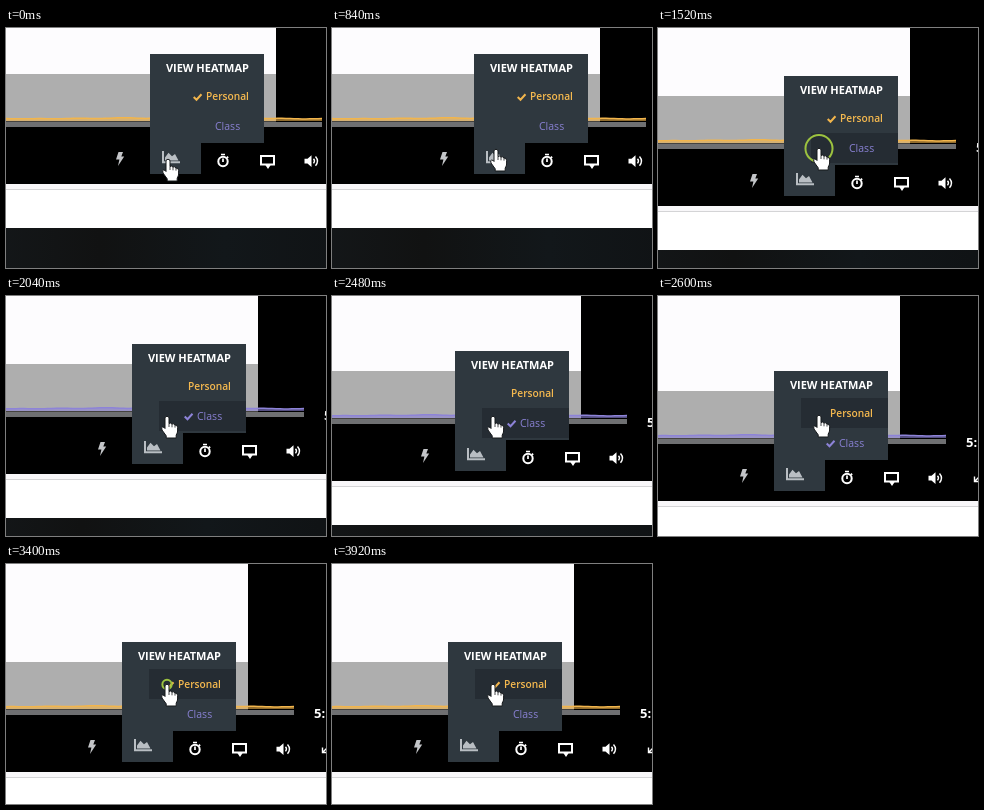
Animation of 320 by 240 pixels, one loop 3960 ms. Source, as an HTML page:

```html
<!DOCTYPE html>
<html lang="en">
<head>
<meta charset="utf-8">
<title>Heatmap menu</title>
<style>
  html, body { margin: 0; width: 100%; height: 100%; overflow: hidden; background: #fff; }
  svg { display: block; width: 100vw; height: 100vh; }
  text { font-family: "Open Sans", "Noto Sans", sans-serif; }
  .title { font-size: 11px; font-weight: 700; fill: #fff; }
  .personal { font-size: 10.2px; font-weight: 600; fill: #f5b94f; }
  .class { font-size: 10.5px; fill: #8880d2; }
  .time { font-size: 13px; font-weight: 700; fill: #fff; }
  .line { fill: none; stroke-width: 2; }
</style>
</head>
<body>
<svg viewBox="0 0 320 240">
  <defs>
    <linearGradient id="footer">
      <stop offset="0" stop-color="#15191c"/>
      <stop offset=".3" stop-color="#111212"/>
      <stop offset=".55" stop-color="#12171a"/>
      <stop offset="1" stop-color="#0e0f10"/>
    </linearGradient>
  </defs>

  <!-- Origin of the page group: top left corner of the menu -->
  <g id="page">
    <rect x="-200" y="-100" width="500" height="400" fill="#fff"/>
    <rect x="-200" y="-100" width="500" height="230" fill="#000"/>
    <rect x="-200" y="-100" width="326" height="120" fill="#fdfcfe"/>
    <rect x="-200" y="20" width="326" height="47" fill="#aeaeae"/>
    <g id="graph">
      <path id="area" opacity=".6"/>
      <path id="curve" fill="none" stroke-width="1.5"/>
    </g>
    <rect x="-200" y="67" width="326" height="1" fill="#45433f"/>
    <rect x="-200" y="68" width="372" height="5" fill="#6f7072"/>
    <rect x="-200" y="130" width="500" height="5" fill="#f8f7f9"/>
    <rect x="-200" y="135" width="500" height="1" fill="#d4d4d6"/>
    <rect x="-200" y="174" width="500" height="120" fill="url(#footer)"/>

    <text class="time" x="192" y="75.5">5:</text>

    <path d="M-31.5 98H-27L-28.7 102.5H-25.8L-32 112L-30.6 105.5H-34Z" fill="#c3c5c8"/>
    <g class="line" stroke="#fff">
      <circle cx="73" cy="107.5" r="4.7"/>
      <path d="M71 100.5h4M73 104.5v3.5M76.8 102.7l1.4 1.2" stroke-width="1.7"/>
      <path d="M111 102H124V110.5H111Z"/>
      <path d="M163.5 104.8q2 2.2 0 4.6M165.5 102.5q4 4.6 0 9.2" stroke-width="1.4"/>
      <path d="M200.5 105.5V110.5H205.5M201 110L207 104" stroke-width="1.4"/>
    </g>
    <path d="M115 110.5H121L118 115ZM154.5 104.8H157.5L161.5 101.2V113L157.5 109.4H154.5Z" fill="#fff"/>

    <path d="M0 0H114V89H51V120H0Z" fill="#2f383f"/>
    <rect id="hover" x="27" width="87" height="30" fill="#252c33"/>
    <path class="line" d="M13 97V108.3H30" stroke="#b9bec3" stroke-width="1.3"/>
    <path d="M15 106.5V103.5L18.5 98.8L22 102.3L25 100L28.5 106.5Z" fill="#b9bec3"/>
    <text class="title" x="99" y="18" text-anchor="end">VIEW HEATMAP</text>
    <text class="personal" x="56" y="46">Personal</text>
    <text class="class" x="65" y="76">Class</text>
    <path id="check" class="line" d="M43.7 43L46.5 45.7L51.5 40.3"/>
  </g>

  <circle id="ring" class="line" stroke="#9cc23f"/>
  <g id="hand" stroke="#15181b" stroke-width="1" stroke-linejoin="round">
    <path fill="#fff" d="M-2 2Q-2 .3 0 .3Q2 .3 2 2V7.5Q3.5 6.4 5 8Q6.7 7.2 8 9Q10.6 8.6 10.6 11.5V15Q10.6 17 9.2 19V22H-.8V19.8L-5 14Q-6 11.3 -4.3 11Q-3 11 -2 12.5Z"/>
    <path fill="none" stroke-width=".8" d="M2 7.5V11M5 8V11.3M8 9V11.6"/>
  </g>
</svg>
<script>
  const LOOP = 3960, STEP = 40;
  const ORANGE = '#f2b54c', PURPLE = '#8d83d8';
  const el = id => document.getElementById(id);

  // time, x, y
  const camera = [
    [400, 144, 26], [840, 142, 26], [880, 140, 30], [920, 140, 30],
    [1000, 129, 43], [1040, 126, 47], [1240, 126, 48], [2400, 126, 48],
    [2480, 123, 55], [2560, 118, 71], [2600, 116, 75], [2920, 116, 78]
  ];
  const pointer = [
    [400, 162, 131], [840, 164, 121], [920, 164, 121], [1040, 161, 120],
    [2560, 161, 120], [2600, 161, 119], [2920, 161, 120]
  ];
  // start, duration
  const clicks = [[1480, 440], [3240, 440], [3800, 160]];

  function at(keys, t) {
    const i = keys.findIndex(k => k[0] > t);
    if (i === 0) return keys[0].slice(1);
    if (i < 0) return keys[keys.length - 1].slice(1);
    const a = keys[i - 1], b = keys[i], p = (t - a[0]) / (b[0] - a[0]);
    return [1, 2].map(n => Math.round(a[n] + (b[n] - a[n]) * p));
  }

  const move = (id, x, y) => el(id).setAttribute('transform', `translate(${x} ${y})`);

  function buildGraph() {
    let d = '';
    for (let x = -200; x <= 172; x += 4) {
      const bump = Math.exp(-(((x + 24) / 20) ** 2));
      const y = 64.6 - bump - 0.35 * Math.sin(x / 9) * Math.cos(x / 23);
      d += `${d ? 'L' : 'M'}${x} ${y.toFixed(2)}`;
    }
    el('curve').setAttribute('d', d);
    el('area').setAttribute('d', d + 'V67H-200Z');
  }

  function draw(t) {
    const [x, y] = at(camera, t), [px, py] = at(pointer, t);
    move('page', x, y);
    move('hand', px, py);

    const row = Math.floor((py - y - 27) / 30);
    el('hover').setAttribute('y', 27 + row * 30);
    el('hover').style.display = row === 0 || row === 1 ? '' : 'none';

    const shared = t >= 1600 && t < 3360;
    const color = shared ? PURPLE : ORANGE;
    el('curve').style.stroke = el('area').style.fill = el('check').style.stroke = color;
    move('check', shared ? 9 : 0, shared ? 29.5 : 0);

    const click = clicks.find(([s, len]) => t >= s && t < s + len);
    const r = click ? 18 * (1 - (t - click[0]) / click[1]) ** 3 : 0;
    const ring = el('ring');
    ring.style.display = r > 0.5 ? '' : 'none';
    ring.setAttribute('cx', px);
    ring.setAttribute('cy', py + 0.5);
    ring.setAttribute('r', r);
  }

  buildGraph();
  const start = performance.now();
  function tick() {
    const t = (performance.now() - start + 2) % LOOP;
    draw(Math.floor(t / STEP) * STEP);
    requestAnimationFrame(tick);
  }
  tick();
</script>
</body>
</html>
```
